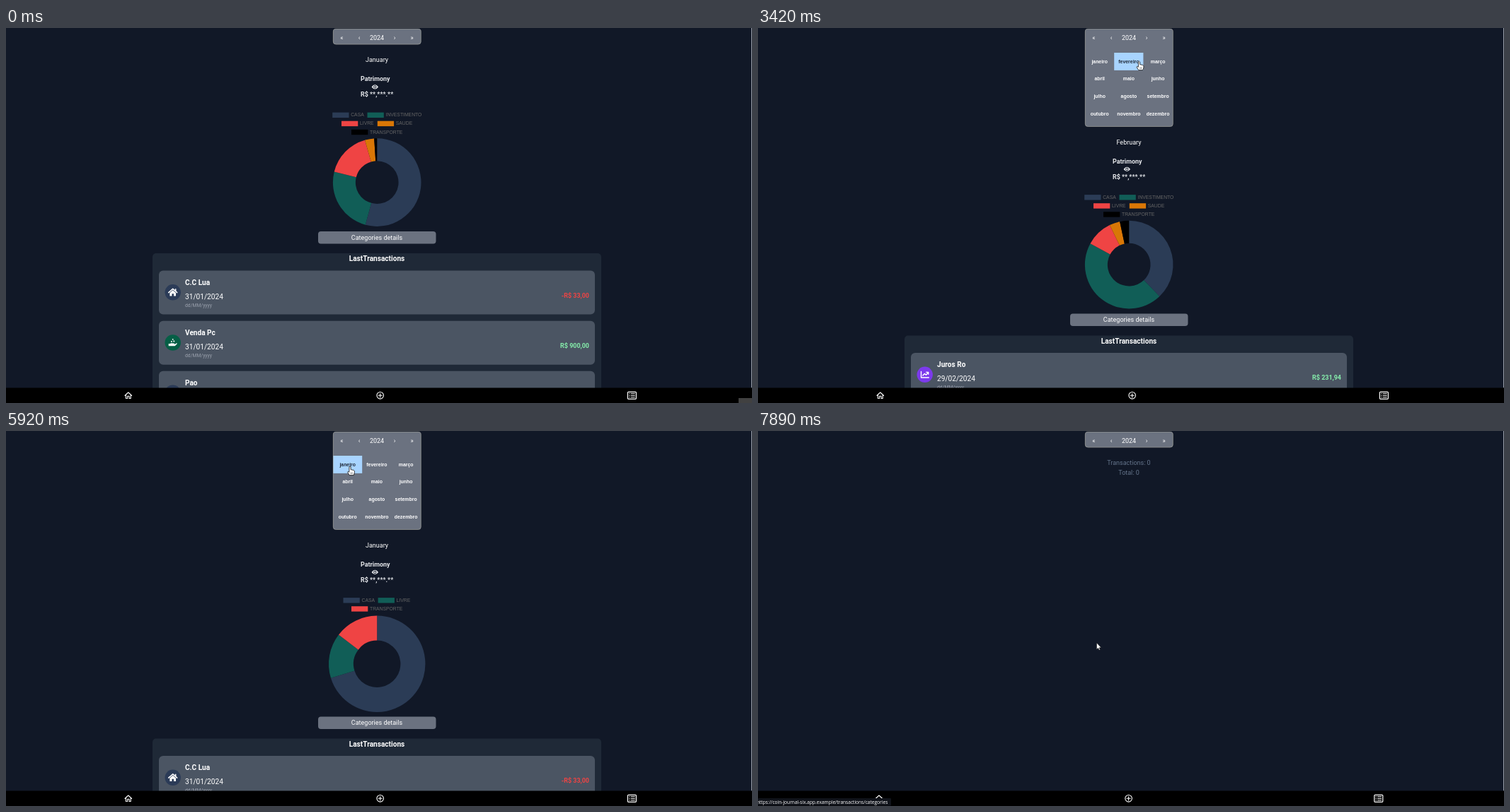
Animation, 1054 px wide and 531 px high, one loop 8000 ms. Source, as an HTML page:

```html
<!DOCTYPE html>
<html lang="en">
<head>
<meta charset="utf-8">
<title>Monthly budget</title>
<style>
html, body { margin: 0; width: 100%; height: 100%; overflow: hidden; background: #111827; }
svg { display: block; width: 100vw; height: 100vh; font-family: Roboto, sans-serif; }
.arial { font-family: "Liberation Sans", Arial, sans-serif; }
.status { font-family: "Open Sans", sans-serif; }
</style>
</head>
<body>
<svg id="stage" viewBox="0 0 1054 531" xmlns="http://www.w3.org/2000/svg"></svg>
<script>
const LOOP = 8000;
const CX = 524.2;
const OPEN_HEIGHT = 116.5;
const TIMES = { open: 1495, close: 6462, status: 7300, leave: 7760 };
const COLORS = ['#2b3c56', '#115e57', '#ef4444', '#d97706', '#000'];
const MONTHS = ['janeiro', 'fevereiro', 'março', 'abril', 'maio', 'junho', 'julho',
  'agosto', 'setembro', 'outubro', 'novembro', 'dezembro'];

// Month tile clicks: time, tile index; the heading follows a little later
const CLICKS = [[2690, 1, 'February'], [3960, 2, 'March'], [5520, 0, 'January']];

const JAN = { y: 218.6, r: 62.3, ends: [195.3, 284, 344, 356.3, 360] };
const FEB = { y: 218.6, r: 62.3, ends: [122.5, 302, 331.7, 346, 360] };
const MAR = { y: 213.3, r: 68.2, ends: [253, 307.4, 360] };
const CHARTS = [[-2000, JAN], [3080, FEB], [4500, MAR], [6370, JAN]];

const HOME_ITEM = { icon: 'house', color: '#2b3b57', name: 'C.C Lua', date: '31/01/2024', sum: '-R$ 33,00' };
const interest = (date, sum) => ({ icon: 'trend', color: '#7c3aed', name: 'Juros Ro', date, sum });
const LATEST = [[0, HOME_ITEM], [3080, interest('29/02/2024', 'R$ 231,94')],
  [4350, interest('31/03/2024', 'R$ 225,29')], [5920, HOME_ITEM]];
const SALE = { icon: 'hand', color: '#065f46', name: 'Venda Pc', date: '31/01/2024', sum: 'R$ 900,00' };
const BREAD = { icon: 'house', color: '#2b3b57', name: 'Pao', date: '31/01/2024', sum: '-R$ 12,00' };

// Pointer path: time, x, y
const PATH = [[460, 1009, 514], [1220, 628, 145], [1490, 548, 23], [1620, 518, 14], [1740, 503, 13],
  [1830, 502, 13], [2030, 514, 40], [2100, 520, 44], [2290, 538.5, 47], [3480, 538.5, 47],
  [3780, 575, 48], [4710, 575, 48], [4980, 499, 59], [5400, 486, 50], [6120, 486, 50],
  [6455, 478, 140], [6550, 472, 193], [6880, 463, 260], [7080, 463.5, 266],
  [7300, 474, 291], [7500, 478.5, 300], [8000, 478.5, 300]];

const mix = (a, b, p) => a + (b - a) * p;
const clamp = v => Math.min(1, Math.max(0, v));
const latest = (list, t) => list.filter(e => e[0] <= t).pop();

// The CSS "ease" curve
function ease(x) {
  if (x <= 0 || x >= 1) return clamp(x);
  const curve = (a, b, u) => 3 * a * u * (1 - u) ** 2 + 3 * b * u * u * (1 - u) + u ** 3;
  let lo = 0, hi = 1;
  for (let i = 0; i < 20; i++) {
    const mid = (lo + hi) / 2;
    if (curve(.25, .25, mid) < x) lo = mid; else hi = mid;
  }
  return curve(.1, 1, lo);
}

const rect = (x, y, w, h, fill, r = 0, extra = '') =>
  `<rect x="${x}" y="${y}" width="${w}" height="${h}" rx="${r}" fill="${fill}" ${extra}/>`;

// y is the middle of the capital letters
function text(str, x, y, o = {}) {
  const { size = 9, fill = '#fff', weight = 400, anchor = 'middle', cls = '' } = o;
  return `<text x="${x}" y="${y + size * .355}" font-size="${size}" fill="${fill}" font-weight="${weight}"
    text-anchor="${anchor}" class="${cls}">${str}</text>`;
}

const at = (x, y, body) => `<g transform="translate(${x} ${y})">${body}</g>`;
const stroke = (d, width = 1.2) =>
  `<path d="${d}" fill="none" stroke="#fff" stroke-width="${width}" stroke-linejoin="round" stroke-linecap="round"/>`;
const shape = (d, fill = '#fff', extra = '') => `<path d="${d}" fill="${fill}" ${extra}/>`;

const ICONS = {
  house: stroke('M-6 .3L0-4.9 6 .3', 1.5) + shape('M3-5H4.7V-1L3-2.5ZM-4.3 .8L0-3 4.3 .8V5.2H1.3V1.9H-1.3V5.2H-4.3Z'),
  trend: stroke('M-5.2-4.3V4.2H5.6', 1.4) + stroke('M-2.8 1.3L-.3-1.4 1.7 .4 4.8-3M2-3.4H5V-.6', 1.4),
  hand: shape('M-6 1.6H-4.2Q-2 .2 0 1H2Q3 1.7 2 2.4H-.5 2.5L5.2 .7Q6.6 .8 5.8 2L3 4.8H-6Z')
    + '<circle cx="-1.8" cy="-1.6" r="1" fill="#fff"/><circle cx="1.6" cy="-2" r="1.1" fill="#fff"/><circle cx="0" cy="-4.6" r=".9" fill="#fff"/>'
};

const ARROW = shape('M0 0V9.2L2.1 7.3 3.5 10.3 4.9 9.7 3.6 6.8H6.4Z', '#fff', 'stroke="#111" stroke-width=".5"');
const HAND = shape('M-1.1 1Q0-.9 1.1 1V4.6L5.2 5.5Q7 6 6.4 8.8L5.3 12.6H-.8L-3.4 8.6Q-3.6 6.6-1.1 8.2Z',
  '#fff', 'stroke="#111" stroke-width=".8" stroke-linejoin="round"')
  + shape('M1.4 8.5V11M3.2 8.5V11', 'none', 'stroke="#111" stroke-width=".5"');

function pointer(t) {
  if (t < PATH[0][0]) return null;
  const i = PATH.findIndex(k => k[0] > t);
  const [t0, x0, y0] = PATH[i - 1], [t1, x1, y1] = PATH[i];
  const p = (t - t0) / (t1 - t0);
  return { x: mix(x0, x1, p), y: mix(y0, y1, p) };
}

const openness = t => ease((t - TIMES.open) / 400) - ease((t - TIMES.close) / 400);

// What lies under the pointer, a moment late
function hovered(t, open) {
  const p = pointer(t - 60);
  if (!p || t >= TIMES.leave) return {};
  if (open > .5 && p.x > 462 && p.x < 586) {
    if (p.y < 26) return p.x < 511 ? { nav: p.x < 487 ? 0 : 1 } : p.x > 537 ? { nav: p.x < 561 ? 2 : 3 } : {};
    if (p.y > 35 && p.y < 134) return { tile: Math.floor((p.y - 35) / 24.8) * 3 + Math.floor((p.x - 462) / 41.2) };
  }
  if (open === 0 && p.x > 441 && p.x < 607 && p.y > 288 && p.y < 305) return { button: true };
  return {};
}

function calendar(t, open, hover) {
  const height = 22.3 + OPEN_HEIGHT * open;
  const click = latest(CLICKS, t);
  let body = '';
  [474.3, 499, 549, 573.5].forEach((x, i) => {
    if (hover.nav === i) body += rect([462, 487, 537, 561][i], 1, 24.5, 25, '#e6e6e6');
    body += text('«‹›»'[i], x, 13.4);
  });
  body += text('2024', 524, 13.7);
  if (open > 0) MONTHS.forEach((name, i) => {
    const x = 462 + i % 3 * 41.2, y = 35 + Math.floor(i / 3) * 24.8;
    const active = click && click[1] === i;
    const lit = active || hover.tile === i;
    if (lit) body += rect(x, y, 41.2, 24.9, active ? '#a8d4ff' : '#e6e6e6');
    body += text(name, x + 20.7, y + 12.2, { size: 6.9, weight: 700, cls: 'arial', fill: lit ? '#1f2937' : '#fff' });
  });
  return `<clipPath id="cal">${rect(462, 1, 124.5, height, '#000', 4)}</clipPath>`
    + rect(462, 1, 124.5, height, '#6b7280', 4)
    + `<g clip-path="url(#cal)">${body}</g>`
    + rect(462.3, 1.3, 123.9, height - .6, 'none', 4, 'stroke="#a0a096" stroke-width=".6"');
}

function ring(cy, r, from, to, fill) {
  if (to - from < .05) return '';
  const point = (deg, rad) => {
    const a = deg * Math.PI / 180;
    return `${(CX + rad * Math.sin(a)).toFixed(2)} ${(cy - rad * Math.cos(a)).toFixed(2)}`;
  };
  const big = to - from > 180 ? 1 : 0, inner = r * .487;
  return shape(`M${point(from, r)}A${r} ${r} 0 ${big} 1 ${point(to, r)}L${point(to, inner)}`
    + `A${inner} ${inner} 0 ${big} 0 ${point(from, inner)}Z`, fill);
}

function chart(t) {
  const i = CHARTS.findIndex(c => c === latest(CHARTS, t));
  const [start, now] = CHARTS[i];
  const before = i ? CHARTS[i - 1][1] : now;
  const p = 1 - (1 - clamp((t - start) / 1000)) ** 4;
  const edges = (s, k) => k < s.ends.length ? [k ? s.ends[k - 1] : 0, s.ends[k]] : [0, 0];
  const y = mix(before.y, now.y, p), r = mix(before.r, now.r, p);
  return legend(now) + now.ends.map((_, k) => {
    const a = edges(before, k), b = edges(now, k);
    return ring(y, r, mix(a[0], b[0], p), mix(a[1], b[1], p), COLORS[k]);
  }).join('');
}

function legend(data) {
  const items = data === MAR
    ? [['CASA', 476.5, 0], ['LIVRE', 525.6, 0], ['TRANSPORTE', 488, 1]]
    : [['CASA', 461.2, 0], ['INVESTIMENTO', 510.5, 0], ['LIVRE', 474, 1], ['SAUDE', 524.8, 1], ['TRANSPORTE', 488, 2]];
  return items.map(([name, x, row], i) => {
    const y = 123.2 + row * 12.1;
    return rect(x, y - 3.6, 23.3, 7.4, COLORS[i])
      + text(name, x + 26, y - .3, { size: 6.8, fill: '#666', anchor: 'start', cls: 'arial' });
  }).join('');
}

function card(y, item) {
  const left = { anchor: 'start' };
  return rect(216, y, 616, 62, '#4b5563', 6)
    + at(235.7, y + 30.8, `<circle r="11.2" fill="${item.color}"/>` + ICONS[item.icon])
    + text(item.name, 253, y + 16.5, { ...left, size: 10.1, weight: 700 })
    + text(item.date, 253, y + 36.6, { ...left, size: 10.15 })
    + text('dd/MM/yyyy', 253, y + 48.8, { ...left, size: 6.8, fill: '#9ca3af' })
    + text(item.sum, 824, y + 35.2, { anchor: 'end', size: 8.95, weight: 700, fill: item.sum[0] === '-' ? '#ef4444' : '#86efac' });
}

function overview(t, open) {
  const named = latest(CLICKS, t - 60);
  const pale = { size: 8.95, weight: 700, fill: '#e5e7eb', anchor: 'start' };
  const eye = shape('M-4.8 0Q0-6.2 4.8 0Q0 6.2-4.8 0Z', '#e5e7eb')
    + '<circle r="2.1" fill="#111827"/><circle r="1.2" fill="#e5e7eb"/>';
  return at(0, OPEN_HEIGHT * open,
    text(named ? named[2] : 'January', 524, 45.2)
    + text('Patrimony', 501, 72, pale) + at(521.3, 83.4, eye) + text('R$ **,***.**', 501, 94.2, pale)
    + chart(t)
    + rect(441, 288, 166.5, 17.6, '#6b7280', 4) + text('Categories details', 524, 296.6)
    + rect(207, 319, 634, 240, '#1f2937', 5)
    + text('LastTransactions', 524, 326.6, { size: 10.1, weight: 700 })
    + card(343.5, latest(LATEST, t)[1]) + card(414.7, SALE) + card(485.8, BREAD));
}

function emptyPage() {
  const grey = { fill: '#64748b' };
  return text('Transactions: 0', 524, 45.2, grey) + text('Total: 0', 524, 58.5, grey);
}

function navBar(left) {
  const [a, b, c] = left ? [171, 523.6, 876.8] : [172.8, 528.7, 884.4];
  const rows = [-2.6, 0, 2.6].map(y => `M-3.8 ${y}H-3.3M-1.3 ${y}H3.9`).join('');
  return rect(0, 509.5, 1054, 21.5, '#000')
    + at(a, 520.3, stroke('M-4.8 .2L0-4.3 4.8 .2M-3.4-.8V4.2H-1.2V1H1.2V4.2H3.4V-.8', 1.1))
    + at(b, 520.3, '<circle r="4.8" fill="none" stroke="#fff" stroke-width="1.1"/>' + stroke('M-2.6 0H2.6M0-2.6V2.6', 1.1))
    + at(c, 520.3, rect(-6, -5, 12, 10, 'none', 1, 'stroke="#fff" stroke-width="1.2"') + stroke(rows, 1));
}

function statusBar() {
  return rect(0, 520, 188, 10.5, '#10131a', 1)
    + text('https://coin-journal-six.app.example/transactions/categories', -2, 525.6,
      { size: 6.6, anchor: 'start', cls: 'status' });
}

function scene(t) {
  const open = openness(t), left = t >= TIMES.leave;
  const hover = hovered(t, open), p = pointer(t);
  const isHand = hover.button || hover.nav !== undefined || hover.tile !== undefined;
  return rect(0, 0, 1054, 531, '#111827')
    + (left ? emptyPage() : overview(t, open))
    + calendar(t, open, hover)
    + rect(1053, 0, 1, 509.5, '#9aa0aa')
    + navBar(left)
    + (t < 70 ? rect(1035, 524, 19, 7, '#414141') : '')
    + (t >= TIMES.status ? statusBar() : '')
    + (p ? at(p.x, p.y, isHand ? HAND : ARROW) : '');
}

const stage = document.getElementById('stage');
const began = performance.now();
function draw() {
  stage.innerHTML = scene((performance.now() - began) % LOOP);
  requestAnimationFrame(draw);
}
draw();
</script>
</body>
</html>
```
